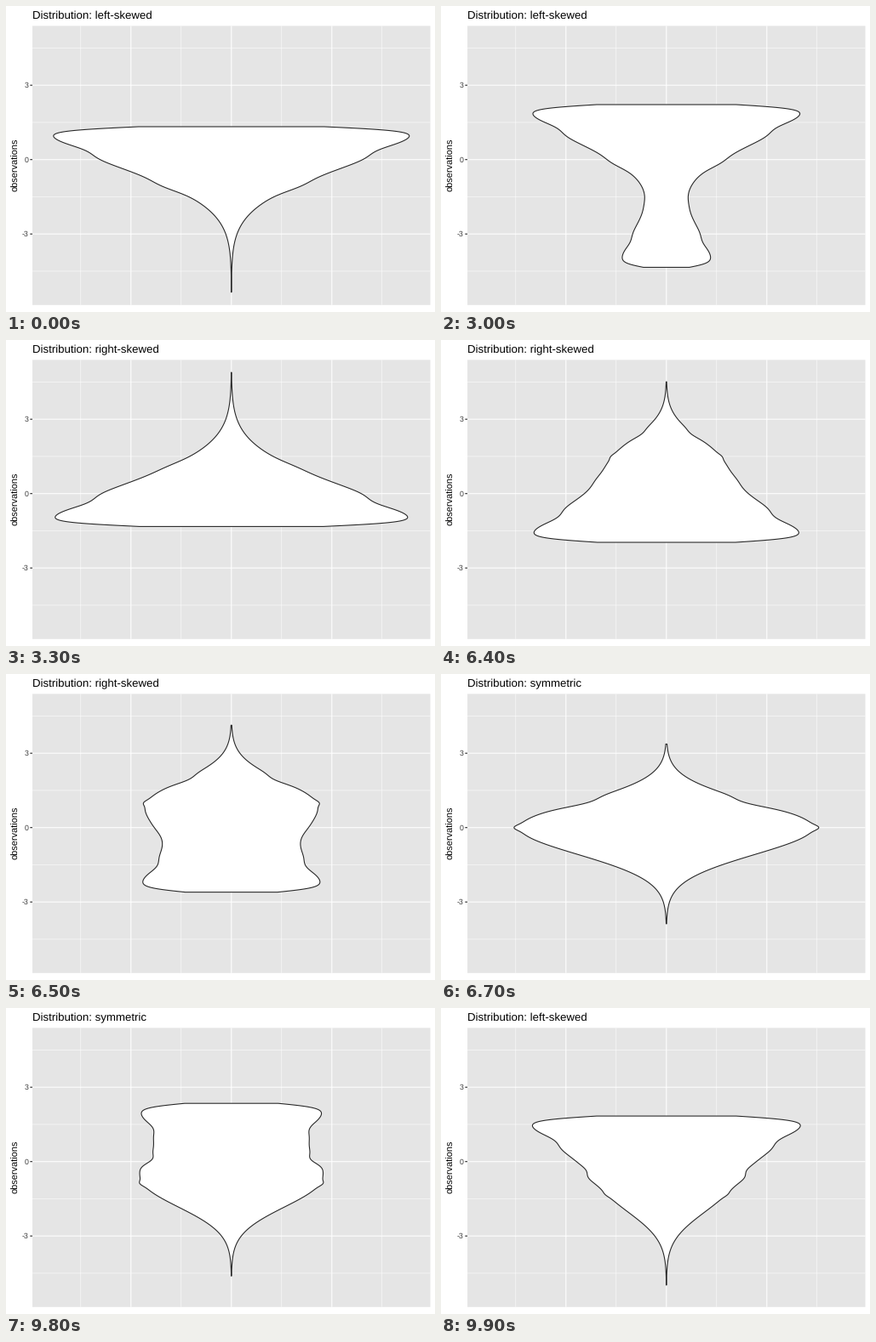
Animation of 504x360 px, one loop 10 s. Source, as a matplotlib script:

```python
import numpy as np
import matplotlib.pyplot as plt
from matplotlib.animation import FuncAnimation
from matplotlib.patches import Polygon, Rectangle

plt.rcParams.update({
    "font.family": "Liberation Sans",
    "text.hinting": "none",
    "text.hinting_factor": 8,
})

W, H, DPI = 504, 360, 72
LEFT, RIGHT, TOP, BOTTOM = 31.0, 498.5, 23.4, 351.8
MID, ZERO, UNIT = 264.8, 180.7, 29.17
INK, TICK_INK, PANEL = "#242424", "#393939", "#e5e5e5"
ROWS = 512
EDGE = 1.327  # where the skewed samples are cut off


def bell(x, centre=0, spread=1):
    return np.exp(-0.5 * ((x - centre) / spread) ** 2)


def skewed(u, peak, dip, swell):
    """Half width of a half-normal density, u units from its soft edge."""
    edge = 1 / (1 + np.exp(-1.702 * u / 0.15))
    return (peak * edge * bell(u, 0, 1.637)
            - dip * bell(u, 0.95, 0.22) + swell * bell(u, 2.4, 0.22))


def symmetric(v):
    """Half width of a nearly normal density with small sampling bumps."""
    sigma = np.where(v > 0, 1.02, 1.08)
    return 172 * bell(v, 0, sigma) + 7 * bell(v, 0, 0.1) - 13 * bell(v, 1, 0.18)


def shape(low, high, width):
    values = np.linspace(low, high, ROWS)
    return np.stack([ZERO - UNIT * values, width(values)])


STATES = [
    ("left-skewed", shape(-5.35, EDGE, lambda v: skewed(EDGE - v, 218, 12, 7))),
    ("right-skewed", shape(-EDGE, 4.89, lambda v: skewed(v + EDGE, 216, 13, 3))),
    ("symmetric", shape(-3.88, 3.37, symmetric)),
]
CHANGES = [29, 63, 96]  # last still frame of each state
STEPS = 4

fig = plt.figure(figsize=(W / DPI, H / DPI), dpi=DPI, facecolor="white")
ax = fig.add_axes([0, 0, 1, 1])
ax.set(xlim=(0, W), ylim=(H, 0))
ax.axis("off")


def line(xs, ys, width, color="white"):
    ax.plot(xs, ys, color=color, lw=width, zorder=1, snap=False,
            solid_capstyle="butt")


ax.add_patch(Rectangle((LEFT, TOP), RIGHT - LEFT, BOTTOM - TOP,
                       fc=PANEL, lw=0, snap=False, zorder=0))
for k in range(-3, 4):
    width = 0.53 if k % 2 else 1.07
    x, y = MID + 59 * k, ZERO - 1.5 * UNIT * k
    line([x, x], [TOP, BOTTOM], width)
    line([LEFT, RIGHT], [y, y], width)
for value in (-3, 0, 3):
    y = ZERO - UNIT * value
    line([LEFT - 2.74, LEFT], [y, y], 1.07, INK)
    ax.text(26.1, y + 3.15, str(value), size=8.8, color=TICK_INK,
            ha="right", va="baseline")
ax.text(14, 186.8, "observations", size=11, rotation=90,
        rotation_mode="anchor", ha="center", va="baseline")
title = ax.text(LEFT, 15, "", size=13.2, ha="left", va="baseline")
violin = ax.add_patch(Polygon(np.zeros((3, 2)), closed=True, fc="white",
                              ec=INK, lw=1.07, joinstyle="round",
                              snap=False, zorder=2))


def state_at(frame):
    """Return the current state, the next one and the progress between."""
    for i, last in enumerate(CHANGES):
        if frame < last + STEPS:
            return STATES[i], STATES[(i + 1) % 3], max(0, frame - last) / STEPS
    return STATES[0], STATES[1], 0


def update(frame):
    (name, now), (next_name, after), t = state_at(frame)
    y, w = (1 - t) * now + t * after
    violin.set_xy(np.column_stack([np.r_[MID - w, MID + w[::-1]],
                                   np.r_[y, y[::-1]]]))
    title.set_text("Distribution: " + (next_name if t > 0.5 else name))
    return violin, title


anim = FuncAnimation(fig, update, frames=100, interval=100, repeat=True,
                     repeat_delay=0, blit=False)
plt.show()
```
